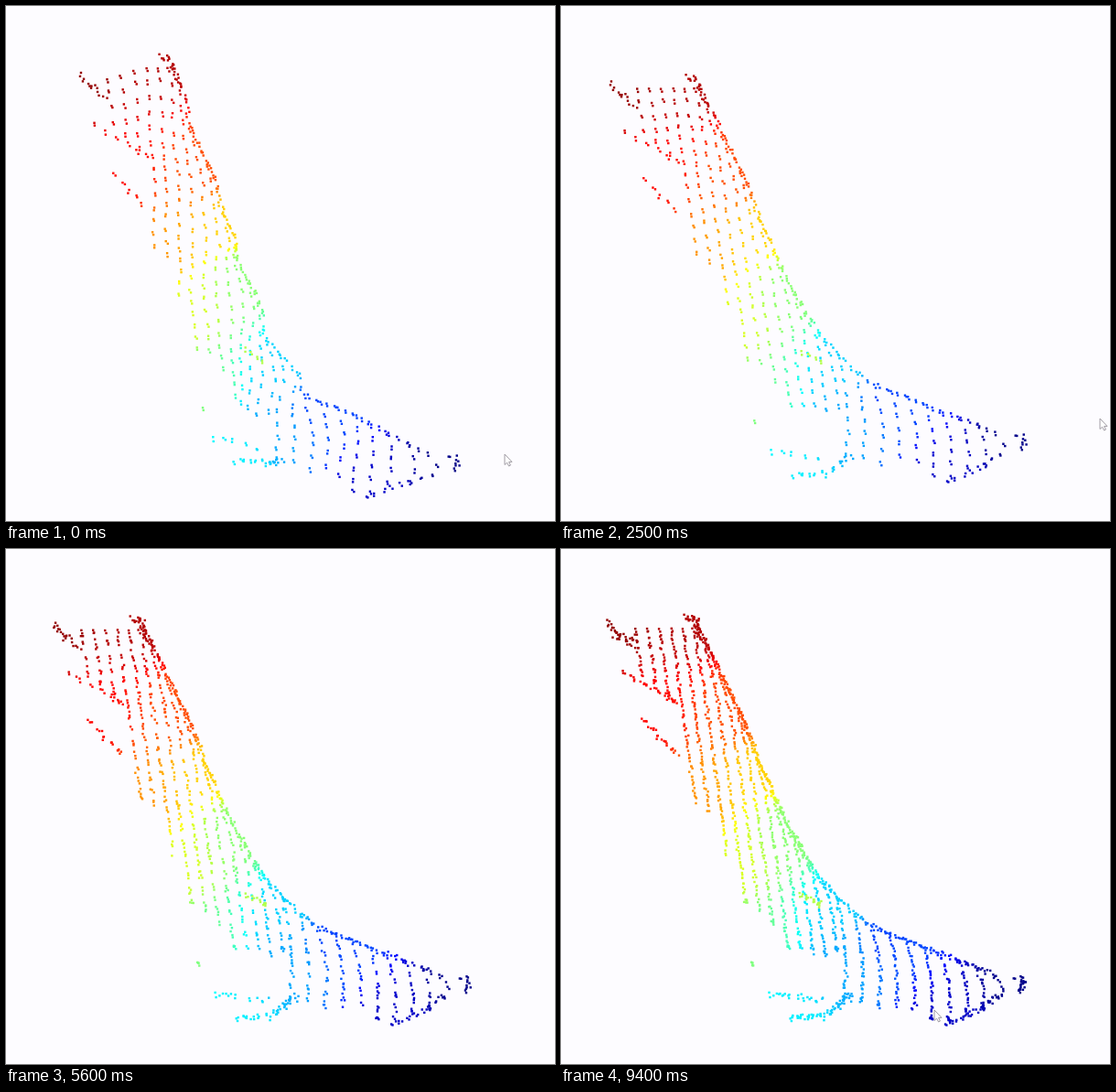
An HTML page with a canvas for the animation above (9500 ms loop, 600 by 563 pixels).

```html
<!DOCTYPE html>
<html lang="en">
<head>
<meta charset="utf-8">
<title>Point cloud</title>
<style>
  html, body { margin: 0; width: 100%; height: 100%; overflow: hidden; background: #fdfcff; }
  canvas { display: block; width: 100vw; height: 100vh; }
</style>
</head>
<body>
<canvas id="view" width="600" height="563"></canvas>
<script>
const LOOP = 9500, STEP = 100, GROW = 3400, FULL = 8500;
const ctx = document.getElementById('view').getContext('2d');

// Linear lookup in rows of key, value, value...
function at(rows, key) {
  if (key <= rows[0][0]) return rows[0].slice(1);
  for (let i = 1; i < rows.length; i++) {
    const a = rows[i - 1], b = rows[i];
    if (key < b[0]) {
      const k = (key - a[0]) / (b[0] - a[0]);
      return a.slice(1).map((v, j) => v + (b[j + 1] - v) * k);
    }
  }
  return rows[rows.length - 1].slice(1);
}

let seed = 20;
function rnd() {
  seed = (seed + 0x6D2B79F5) | 0;
  let t = Math.imul(seed ^ (seed >>> 15), 1 | seed);
  t = (t + Math.imul(t ^ (t >>> 7), 61 | t)) ^ t;
  return ((t ^ (t >>> 14)) >>> 0) / 4294967296;
}
const spread = k => (rnd() + rnd() - 1) * k;

// Key places: rest x, y, offset of the starting pose, height in percent
const anchors = [
  [54, 81, 27, -9, 98], [143, 76, 31, -22, 95], [91, 188, 27, -5, 87],
  [145, 285, 14, -7, 73], [197, 182, 24, -7, 80], [222, 240, 21, -5, 67],
  [254, 307, 10, -12, 51], [185, 345, 6, -9, 59], [211, 430, 4, -14, 48],
  [311, 389, -4, 0, 33], [253, 514, -4, -15, 36], [308, 455, -17, 6, 29],
  [357, 423, -17, 12, 19], [423, 521, -28, 17, 7], [505, 472, -13, 23, 1]
];

// Distance-weighted blend of the key places
function sample(x, y) {
  let sum = 0, dx = 0, dy = 0, c = 0;
  for (const a of anchors) {
    const d = (x - a[0]) ** 2 + (y - a[1]) ** 2 + 150, w = 1 / (d * d);
    sum += w; dx += w * a[2]; dy += w * a[3]; c += w * a[4];
  }
  return [dx / sum, dy / sum, c / sum / 100];
}

function jet(c) {
  const ch = k => Math.round(255 * Math.max(0, Math.min(1, 1.5 - Math.abs(4 * c - k))));
  return `rgb(${ch(3)},${ch(2)},${ch(1)})`;
}

const dots = [];
function addDot(x, y, born, tone) {
  const [dx, dy, c] = sample(x, y);
  dots.push({ x, y, dx, dy, born, color: jet(tone || c) });
}

function along(line, dist) {
  for (let i = 1; i < line.length; i++) {
    const [x, y] = line[i - 1], [u, v] = line[i], len = Math.hypot(u - x, v - y);
    if (dist <= len) return [x + (u - x) * dist / len, y + (v - y) * dist / len];
    dist -= len;
  }
  return null;
}

// Each stop has a pair of first dots; later ones fill the gap to the next stop
function scan(line, gap, jitter, tone) {
  for (let s = rnd() * 2, p; (p = along(line, s)); s += gap * (0.85 + rnd() * 0.3)) {
    const x = p[0] + spread(jitter), y = p[1] + spread(jitter);
    addDot(x, y, 0, tone);
    addDot(x + 1 + spread(jitter), y + 3 + spread(jitter), 0, tone);
    for (let i = 0; i < 3; i++) {
      const q = along(line, s + gap * (0.2 + 0.8 * (i + rnd()) / 3)) || p;
      addDot(q[0] + spread(jitter + 1), q[1] + spread(jitter + 1), GROW + rnd() * (FULL - GROW), tone);
    }
  }
}

// Front outline from knee to toes, and the underside of the foot
const ridge = [[146, 76], [185, 155], [203, 190], [222, 241], [250, 303],
  [283, 357], [311, 389], [340, 412], [390, 432], [475, 465]];
const ridgeByY = ridge.map(([x, y]) => [y, x]);
const sole = [[311, 496], [378, 502], [422, 520], [455, 505], [481, 490]];

// Leg: parallel lines that bend softly into the ridge
const legEnds = [147, 151, 166, 284, 291, 338, 390, 403, 411, 440, 440, 448, 451, 440];
legEnds.forEach((end, i) => {
  const line = [], soft = 7;
  for (let y = 89; y <= end; y += 4) {
    const x = 141 + 13.2 * (i - 3) + 0.14 * (y - 220), [front] = at(ridgeByY, y);
    if (x - front < 18) line.push([-soft * Math.log(Math.exp(-x / soft) + Math.exp(-front / soft)), y]);
  }
  scan(line, 14, 1.4);
});

// Foot: bowed lines from ridge to sole
for (let x = 303; x < 480; x += 19) {
  const [top] = at(ridge, x), [low] = at(sole, x + 8), line = [];
  for (let u = 0; u <= 1; u += 0.125) {
    line.push([x + 8 * u + 5 * Math.sin(Math.PI * u), top + (low - top) * u]);
  }
  scan(line, 14, 1.5);
}

scan(ridge, 11, 1.8);
scan(sole.slice(2), 9, 3);
scan([[69, 136], [127, 168]], 13, 2);
scan([[91, 188], [130, 228]], 11, 2.5);
scan([[229, 485], [290, 493]], 12, 3);
scan([[252, 512], [290, 510], [318, 488]], 6, 3);
scan([[54, 81], [60, 97], [84, 106]], 6, 5);
scan([[138, 77], [151, 80], [152, 98]], 6, 4);
scan([[499, 468], [509, 471], [503, 485]], 5, 4);
scan([[261, 375], [288, 391]], 9, 2.5, 0.55);
scan([[211, 452], [211, 455]], 5, 0.6, 0.5);

const turn = [[200, 0], [700, 0.2], [1500, 0.8], [2100, 1]];
const dip = [[200, 0], [700, 6], [1500, 6], [2600, 0]];
const drift = [[GROW, 0], [FULL, 1]];
const leave = [[200, 545, 490], [700, 548, 471], [1500, 577, 455], [2500, 589, 451]];
const back = [[9300, 544, 460], [9400, 408, 504]];

const arrow = new Path2D('M0 0V11.5L2.6 9.2L4.6 13L6.4 12.1L4.6 8.4H8Z');
function drawPointer([x, y]) {
  ctx.save();
  ctx.translate(x, y);
  ctx.fillStyle = '#fff';
  ctx.strokeStyle = '#a09ca4';
  ctx.fill(arrow);
  ctx.stroke(arrow);
  ctx.restore();
}

function draw(t) {
  ctx.fillStyle = '#fdfcff';
  ctx.fillRect(0, 0, 600, 563);
  const [r] = at(turn, t), [e] = at(dip, t), [p] = at(drift, t);
  for (const d of dots) {
    if (d.born > t) continue;
    const x = d.x + d.dx * (1 - r) - 2 * p;
    const y = d.y + d.dy * (1 - r) + e * (1 - d.x / 520) - 3.5 * p * (1 - d.y / 500);
    ctx.fillStyle = d.color;
    ctx.fillRect(x - 1.2, y - 1.2, 2.4, 2.4);
  }
  if (t < 2600) drawPointer(at(leave, t));
  else if (t >= 9300) drawPointer(at(back, t));
}

const start = performance.now();
function tick() {
  const t = (performance.now() - start) % LOOP;
  draw(Math.floor(t / STEP) * STEP);
  requestAnimationFrame(tick);
}
tick();
</script>
</body>
</html>
```
